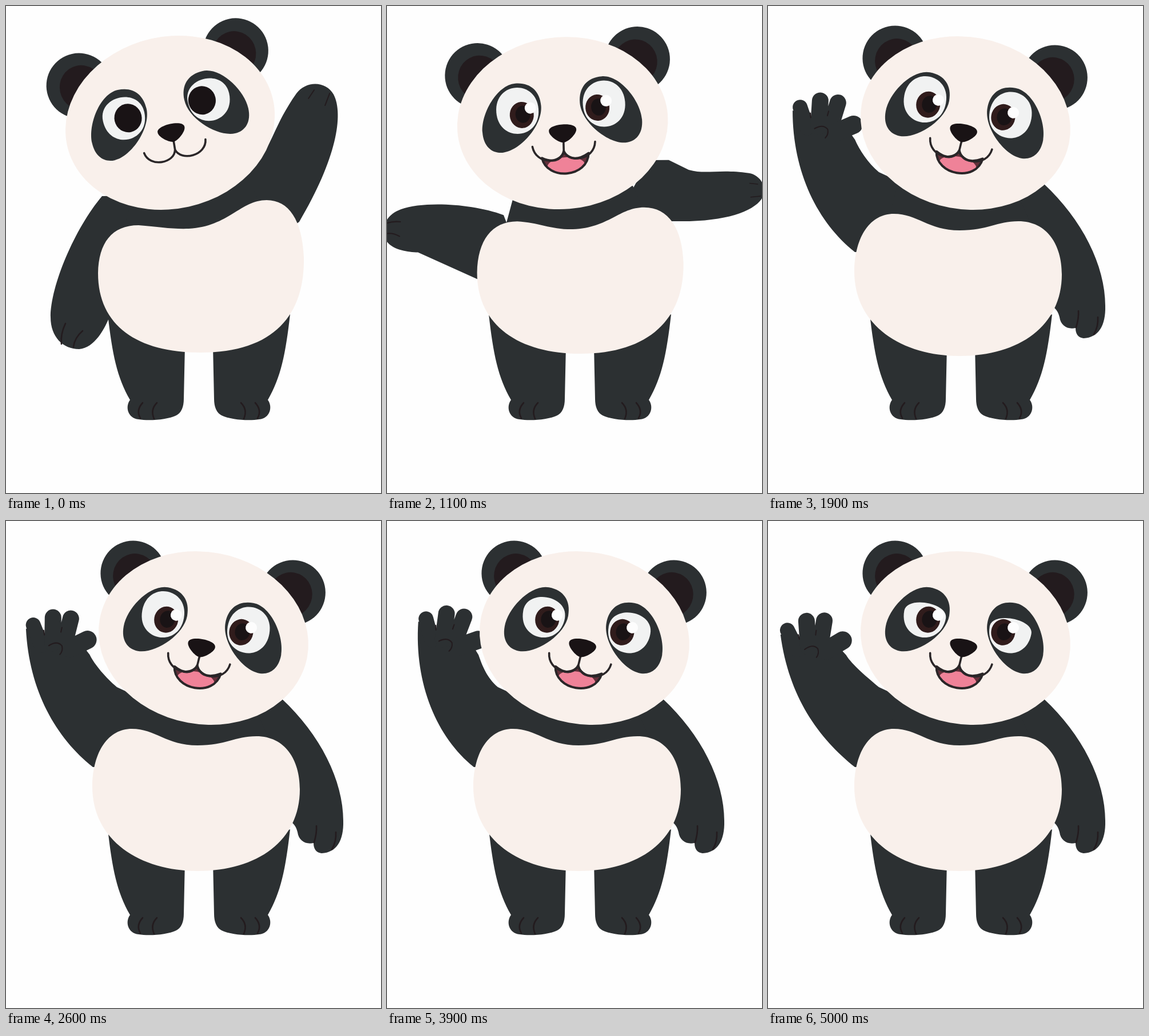
Animation of 656x853 px, one loop 5100 ms. Source, as an HTML page with a canvas:

```html
<!DOCTYPE html>
<html lang="en">
<head>
<meta charset="utf-8">
<title>Waving panda</title>
<style>
  html, body { margin: 0; width: 100%; height: 100%; overflow: hidden; background: #fefefe; }
  canvas { display: block; }
</style>
</head>
<body>
<canvas id="stage" width="656" height="853"></canvas>
<script>
const ctx = document.getElementById('stage').getContext('2d');
const LOOP = 5100, STEP = 100, WAVE = 461;
const DARK = '#2c3032', CREAM = '#f9f0eb', LINE = '#231b1e', INK = '#191315';

const clamp = v => Math.min(1, Math.max(0, v));
const mix = (a, b, k) => a + (b - a) * k;
const rad = deg => deg * Math.PI / 180;
const easeInOut = u => u < .5 ? 4 * u ** 3 : 1 - 4 * (1 - u) ** 3;

function fill(d, color) {
  ctx.fillStyle = color;
  ctx.fill(new Path2D(d));
}

function stroke(d, width = 2.6, color = LINE) {
  ctx.lineWidth = width;
  ctx.strokeStyle = color;
  ctx.stroke(new Path2D(d));
}

function oval(x, y, rx, ry, color) {
  ctx.fillStyle = color;
  ctx.beginPath();
  ctx.ellipse(x, y, rx, ry, 0, 0, 7);
  ctx.fill();
}

function scoped(draw) {
  ctx.save();
  draw();
  ctx.restore();
}

// Rotates and scales a drawing around a joint.
function around(x, y, deg, scale, draw) {
  scoped(() => {
    ctx.translate(x, y);
    ctx.rotate(rad(deg));
    ctx.scale(scale, scale);
    ctx.translate(-x, -y);
    draw();
  });
}

// Draws once as is and once mirrored on the vertical line x = axis.
function mirrored(axis, draw) {
  draw(-1);
  scoped(() => {
    ctx.translate(2 * axis, 0);
    ctx.scale(-1, 1);
    draw(1);
  });
}

function leg() {
  fill('M178 540C186 610 194 650 217 690C208 702 213 722 232 724C250 727 282 725 298 717Q311 710 311 688L313 595Z', DARK);
  stroke('M239 695Q227 708 235 722M264 695Q252 707 259 723');
}

function leftHanging() {
  fill('M168 333C120 390 78 490 78 545C78 580 100 601 128 601C155 599 173 565 182 542L300 420L300 330Z', DARK);
  stroke('M104 556Q95 575 97 592M134 569Q120 581 118 597');
}

function leftRaised(deg) {
  const a = rad(deg), px = 150, py = 350;
  const turn = (x, y) => [
    px + (x - px) * Math.cos(a) - (y - py) * Math.sin(a),
    py + (x - px) * Math.sin(a) + (y - py) * Math.cos(a)
  ].join(' ');
  fill(`M152 431C88 380 ${turn(42, 295)} ${turn(40, 185)}L${turn(72, 195)} ${turn(125, 200)} ${turn(150, 234)}` +
    `C${turn(158, 252)} 175 275 194 291L300 340L300 430Z`, DARK);
  around(px, py, deg, 1, () => {
    stroke('M53 179L66 215', 26, DARK);
    stroke('M88 167L86 212M119 170L107 212', 29, DARK);
    stroke('M147 208L116 222', 32, DARK);
    stroke('M71 189L72 197M103 185L101 193', 2);
    stroke('M79 216Q94 207 102 217Q104 226 98 232', 2);
  });
}

function rightRaised() {
  fill('M400 300L440 270C468 240 468 210 508 153C525 130 560 131 573 155C591 190 578 268 513 378L440 430L380 340Z', DARK);
  stroke('M529 162L539 147M558 174L566 153', 2);
}

function rightHanging() {
  fill('M430 290L482 311C550 374 590 455 590 525C591 560 578 581 552 582Q538 580 538 564C524 567 512 560 510 545Q508 537 504 532L400 420L400 320Z', DARK);
  stroke('M543 534Q544 546 539 563M577 545Q578 562 570 575');
}

function arms(t, turn, open) {
  const size = 1 - .22 * Math.sin(Math.PI * turn);
  const settle = clamp((t - 1100) / 500);
  const leftWave = -6.6 * settle * Math.cos(2 * Math.PI * (t - 5000) / WAVE);
  const rightWave = 7 * (Math.cos(2 * Math.PI * t / WAVE + .92) - .6);

  if (turn < .5) {
    around(170, 380, 145 * turn - .8 * open, size, leftHanging);
    around(490, 350, 140 * turn + rightWave * (1 - turn), size, rightRaised);
  } else {
    around(170, 380, -145 * (1 - turn), size, () => leftRaised(leftWave));
    around(480, 340, -140 * (1 - turn), size, rightHanging);
  }
}

const bellyA = [161, 468, 162, 415, 185, 384, 232, 384, 268, 387, 290, 391, 320, 390,
  390, 386, 410, 340, 456, 340, 495, 340, 518, 375, 521, 440,
  523, 540, 470, 607, 340, 607, 230, 607, 161, 560, 161, 468];
const bellyB = [151, 465, 152, 402, 180, 364, 220, 364, 262, 364, 280, 393, 335, 393,
  385, 393, 400, 377, 438, 377, 488, 377, 514, 418, 514, 470,
  514, 560, 440, 613, 335, 613, 235, 613, 151, 560, 151, 465];

function belly(k) {
  const p = bellyA.map((v, i) => mix(v, bellyB[i], k));
  fill(`M${p[0]} ${p[1]}C${p.slice(2).join(' ')}Z`, CREAM);
}

// The upper edge of the white bends down as the lid closes.
function eye(x, irisX, irisY, lid, open) {
  const left = x - 37, right = x + 37, top = -54 * (1 - 2 * lid);
  const white = `M${left} 0C${left} ${top} ${right} ${top} ${right} 0C${right} 54 ${left} 54 ${left} 0Z`;
  scoped(() => {
    fill(white, '#f1f2f2');
    ctx.clip(new Path2D(white));
    ctx.globalAlpha = 1 - open;
    oval(irisX, irisY - 4, 24, 25, INK);
    ctx.globalAlpha = open;
    oval(irisX, irisY, 21, 23, '#301c1c');
    oval(irisX + 2, irisY - 1, 13, 15, INK);
    oval(irisX + 16, irisY - 11, 10, 10, '#fdfdfd');
  });
}

function mouth(open) {
  if (open > 0) {
    const low = mix(92, 127, open);
    const d = `M-40 86Q-13 101 -1 79Q13 101 42 84C38 ${low} -34 ${low} -40 86Z`;
    scoped(() => {
      fill(d, '#63303a');
      ctx.clip(new Path2D(d));
      oval(1, low - 24, 33, 15, '#ef8298');
    });
    stroke(d, 4, '#2a2628');
  }
  const end = mix(70, 65, open);
  stroke(`M-55 ${end}C-51 98 -6 99 -1 76C5 99 51 98 55 ${end}M0 60L-1 78`, 3.6, '#2a2628');
}

function head(k, lid, open) {
  ctx.translate(mix(280, 349.5, k), 177.3);
  ctx.rotate(rad(mix(-12.6, 10.4, k)));
  mirrored(0, side => {
    const y = -70 - 8.5 * side * k;
    oval(-140.5, y, 57, 57, DARK);
    oval(-137, y + 4, 38, 39, LINE);
  });
  oval(1, 28, 184.5, 150.7, CREAM);
  mirrored(0, () =>
    fill('M34 -5C34 -32 50 -48 76 -48C108 -48 140 0 140 33C140 58 126 71 108 71C78 71 34 30 34 -5Z', DARK));
  eye(-76, -69, 8, lid, open);
  eye(76, 64, 6, lid, open);
  mouth(open);
  fill('M-24 40C-24 27 24 27 24 40C25 48 8 62 0 62C-8 62 -25 48 -24 40Z', INK);
}

function draw(t) {
  const pose = easeInOut(clamp((t - 800) / 680));
  const armTurn = 1 - (1 - pose) ** 1.6;
  const open = clamp((t - 200) / 300);
  const lid = Math.max(0, ...[-184, 4075, 5150].map(c => 1 - Math.abs(t - c) / 200));

  ctx.fillStyle = '#fefefe';
  ctx.fillRect(0, 0, 656, 853);
  ctx.lineCap = ctx.lineJoin = 'round';
  mirrored(337.5, leg);
  arms(t, armTurn, open);
  fill('M225 320L430 315L490 450L190 450Z', DARK);
  belly(pose);
  scoped(() => head(pose, lid, open));
}

function frame() {
  draw(Math.floor(performance.now() % LOOP / STEP) * STEP);
  requestAnimationFrame(frame);
}
frame();
</script>
</body>
</html>
```
